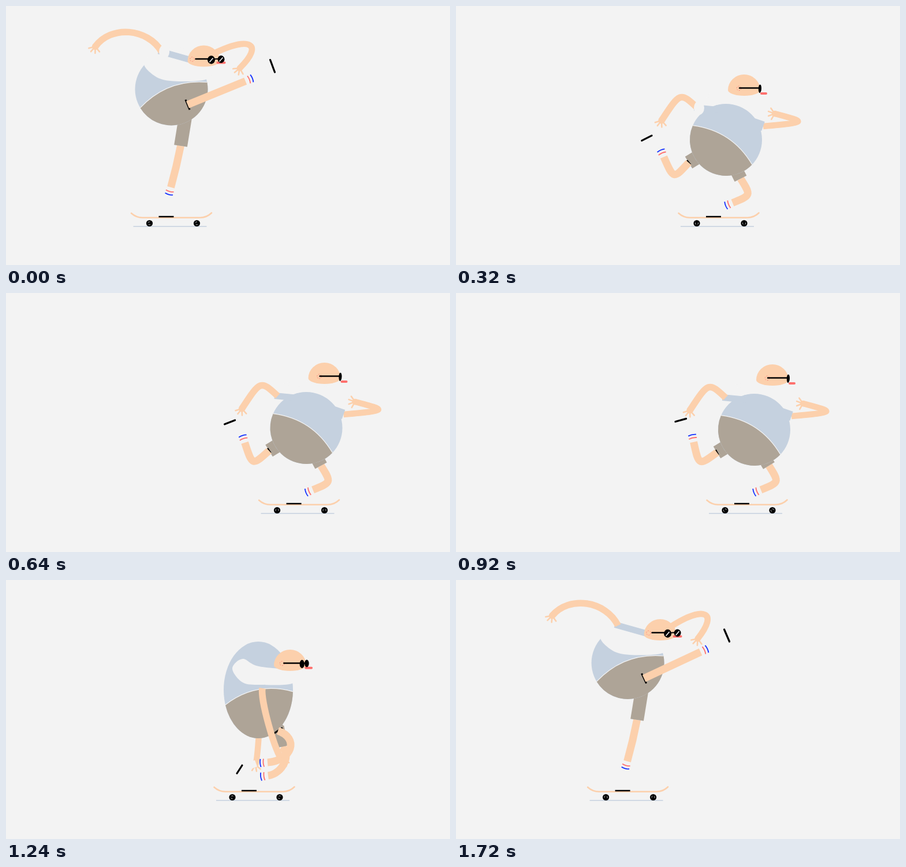
Recreate the animation shown at these times as an HTML page with a canvas. Size 769x450 px, loop 1.76 s.

```html
<!DOCTYPE html>
<html lang="en">
<head>
<meta charset="utf-8">
<title>Skater</title>
<style>
html, body { margin: 0; width: 100%; height: 100%; overflow: hidden; background: #f3f3f3; }
canvas { display: block; }
</style>
</head>
<body>
<canvas id="stage" width="769" height="450"></canvas>
<script>
const ctx = document.getElementById('stage').getContext('2d');
const LOOP = 1760, STEP = 40, RAD = Math.PI / 180;
const PAPER = '#f3f3f3', SKIN = '#fcd0ac', SHIRT = '#c5d1df', SHORTS = '#aea497',
      RED = '#ff706d', BLUE = '#1230ff', BLACK = '#000';

// Points become relative to the middle of the board. Limbs are root, joint, tip.
// belt: angle of the shorts; round: softness of the joints; turn: 0 = half view, 1 = profile.
function pose(boardX, points, scalars) {
  const out = { ...scalars };
  for (const name in points) out[name] = points[name].map((v, i) => i % 2 ? v : v - boardX);
  return out;
}

const kick = pose(297, {
  center: [297,144], hip: [324,175], neck: [326,92], head: [353,92],
  near: [280,79, 226,41, 166,62],
  far: [370,82, 430,60, 418,102],
  stand: [313,243, 305,279, 296,315],
  leg: [325,171, 374,148, 423,125],
  sole: [473,107, 464,86],
  beard: [250,96, 268,121, 300,130, 357,127, 368,105, 335,78, 292,72]
}, { radius: [63, 63], belt: [69], round: [0.55], turn: [0] });

const glide = pose(507, {
  center: [519.5,234.5], hip: [530,272], neck: [500,182], head: [551,145],
  near: [470,179, 440,161, 408,201],
  far: [584,211, 644,203, 604,189],
  stand: [545,300, 557,327, 531,342],
  leg: [455,274, 428,292, 413,260],
  sole: [396,221, 378,228],
  beard: [480,158, 490,161, 510,163, 550,163, 560,160, 540,155, 500,154]
}, { radius: [62.5, 62.5], belt: [123.5], round: [0], turn: [1] });

const crouch = pose(430, {
  center: [437,191], hip: [470,255], neck: [430,190], head: [492,145],
  near: [444,188, 455,252, 479,314],
  far: [440,200, 438,268, 432,321],
  stand: [477,290, 482,318, 454,340],
  leg: [471,262, 492,293, 453,317],
  sole: [409,322, 400,336],
  beard: [392,154, 410,178, 440,182, 495,180, 515,160, 438,150, 410,137]
}, { radius: [60, 84], belt: [82], round: [0.7], turn: [0.55] });

function mix(a, b, k) {
  const out = {};
  for (const name in a) out[name] = a[name].map((v, i) => v + (b[name][i] - v) * k);
  return out;
}

function rotate(points, [cx, cy], angle) {
  const c = Math.cos(angle), s = Math.sin(angle);
  return points.map((v, i) => i % 2
    ? cy + (points[i - 1] - cx) * s + (v - cy) * c
    : cx + (v - cx) * c - (points[i + 1] - cy) * s);
}

// Swings limbs about their roots and lowers all but the standing leg.
function adjust(base, drop, swing) {
  const out = { ...base };
  for (const name in swing) out[name] = rotate(base[name], base[name], swing[name]);
  out.sole = rotate(base.sole, base.leg, swing.leg);
  for (const name of ['center', 'hip', 'neck', 'head', 'near', 'far', 'leg', 'sole', 'beard'])
    out[name] = out[name].map((v, i) => i % 2 ? v + drop : v);
  return out;
}

const kickEnd = adjust(kick, 0.5, { leg: 0.05, near: -0.07, far: 0.12 });
const kickLow = adjust(kick, 3, { leg: 0.03 });
const push = { ...mix(kick, glide, 0.5),
  near: [-30,120, -92,98, -150,125], leg: [2,235, 17,290, -2,345], sole: [-22,381, 5,381] };
const reach = { ...mix(glide, crouch, 0.35),
  far: [72,203, 125,209, 176,225], leg: [-40,272, -80,288, -100,270], sole: [-117,238, -131,254] };

const linear = k => k, easeIn = k => k * k, easeOut = k => k * (2 - k);
const poseKeys = [
  [0, kickEnd, easeIn], [180, push, easeOut],
  [320, adjust(glide, -2, { leg: -0.1 }), linear],
  [640, glide, linear],
  [920, adjust(glide, 3, { leg: 0.1 }), easeIn],
  [1120, reach, linear], [1240, crouch, easeOut],
  [1440, kickLow, linear], [1480, kickLow, linear],
  [1720, kick, linear], [LOOP, kickEnd, linear]
];
const boardKeys = [
  [-40, 297], [0, 286.5], [150, 242], [240, 345], [320, 455], [480, 497],
  [700, 508.5], [920, 504], [1240, 430], [1760, 286.5], [1800, 275.5]
];

function poseAt(t) {
  const i = poseKeys.findIndex(key => key[0] > t) - 1;
  const [t0, from, ease] = poseKeys[i], [t1, to] = poseKeys[i + 1];
  return mix(from, to, ease((t - t0) / (t1 - t0)));
}

function boardAt(t) {
  const i = boardKeys.findIndex(key => key[0] > t) - 1;
  const slope = j => (boardKeys[j + 1][1] - boardKeys[j - 1][1]) / (boardKeys[j + 1][0] - boardKeys[j - 1][0]);
  const [t0, x0] = boardKeys[i], [t1, x1] = boardKeys[i + 1];
  const d = t1 - t0, k = (t - t0) / d, k2 = k * k, k3 = k2 * k;
  return x0 * (2 * k3 - 3 * k2 + 1) + x1 * (3 * k2 - 2 * k3) +
    d * (slope(i) * (k3 - 2 * k2 + k) + slope(i + 1) * (k3 - k2));
}

function stroke(color, width, cap = 'butt') {
  ctx.strokeStyle = color;
  ctx.lineWidth = width;
  ctx.lineCap = cap;
  ctx.stroke();
}
function fill(color) { ctx.fillStyle = color; ctx.fill(); }
function line([x1, y1], [x2, y2], color, width, cap) {
  ctx.beginPath();
  ctx.moveTo(x1, y1);
  ctx.lineTo(x2, y2);
  stroke(color, width, cap);
}
function arc(x, y, rx, ry, from = 0, to = 7) {
  ctx.beginPath();
  ctx.ellipse(x, y, rx, ry, 0, from, to);
}
function oval(x, y, rx, ry, color) { arc(x, y, rx, ry); fill(color); }

// Draws a curve through the joint; returns the tip and its direction.
function limb([ax, ay, mx, my, bx, by], round, width) {
  const control = (a, m, b, side) => (8 * m - a - b) / 6 + side * round / 2 * (a - b);
  const cx = control(ax, mx, bx, -1), cy = control(ay, my, by, -1);
  ctx.beginPath();
  ctx.moveTo(ax, ay);
  ctx.bezierCurveTo(control(ax, mx, bx, 1), control(ay, my, by, 1), cx, cy, bx, by);
  stroke(SKIN, width);
  return [bx, by, Math.atan2(by - cy, bx - cx)];
}

function arm(points, round, width) {
  const [x, y, angle] = limb(points, round, width);
  oval(x, y, width / 2, width / 2, SKIN);
  for (const spread of [40, 5, -35, -75]) {
    const a = angle + spread * RAD;
    line([x, y], [x + 11.5 * Math.cos(a), y + 11.5 * Math.sin(a)], SKIN, 2.6, 'round');
  }
}

function leg(points, round) {
  const [x, y, angle] = limb(points, round, 13);
  ctx.save();
  ctx.translate(x, y);
  ctx.rotate(angle);
  for (const [d, color] of [[6.5, RED], [12, BLUE]]) {
    ctx.beginPath();
    ctx.moveTo(d, -7);
    ctx.quadraticCurveTo(d + 2, 0, d, 7);
    stroke(color, 1.8);
  }
  ctx.restore();
  return [x + 20 * Math.cos(angle), y + 20 * Math.sin(angle)];
}

function blob(p) {
  const n = p.length, at = i => p[(i + n) % n];
  ctx.beginPath();
  ctx.moveTo(p[0], p[1]);
  for (let i = 0; i < n; i += 2) {
    const ahead = j => at(j) + (at(j + 2) - at(j - 2)) / 6;
    const behind = j => at(j) - (at(j + 2) - at(j - 2)) / 6;
    ctx.bezierCurveTo(ahead(i), ahead(i + 1), behind(i + 2), behind(i + 3), at(i + 2), at(i + 3));
  }
  fill(PAPER);
}

function shorts({ center: [x, y], radius: [rx, ry], belt: [angle] }) {
  const ends = [80, -80].map(side => {
    const a = (angle + side) * RAD;
    return [x + rx * Math.cos(a), y + ry * Math.sin(a)];
  });
  const [[lx, ly], [hx, hy]] = ends, bulge = 30 / Math.hypot(hx - lx, hy - ly);
  const belt = [(lx + hx) / 2 + (hy - ly) * bulge, (ly + hy) / 2 - (hx - lx) * bulge, hx, hy];
  arc(x, y, rx, ry, (angle - 80) * RAD, (angle + 80) * RAD);
  ctx.quadraticCurveTo(...belt);
  fill(SHORTS);
  ctx.beginPath();
  ctx.moveTo(lx, ly);
  ctx.quadraticCurveTo(...belt);
  stroke(PAPER, 1.2);
}

function head([x, y], turn) {
  const between = (a, b) => a + (b - a) * turn;
  const lenses = [[between(13, 27), 1, between(6.5, 2.2), 7.2], [between(30, 28), 0, between(6, 2), 6.5]];
  ctx.save();
  ctx.translate(x, y);
  arc(0, 3, 28, 27, Math.PI, 2 * Math.PI);
  ctx.ellipse(0, 3, 28, 10, 0, 0, Math.PI);
  fill(SKIN);
  ctx.setLineDash([2, 2]);
  arc(between(-20, -9), 0, 3.8, 3.8);
  stroke(RED, 0.8);
  ctx.setLineDash([]);
  const mouthY = between(6, 9);
  line([between(24, 30), mouthY], [between(36, 38), mouthY], RED, 4, 'round');
  line([between(-14, -8), -0.5], [lenses[0][0], -0.5], BLACK, 2.4, 'round');
  line([lenses[0][0], 0], [lenses[1][0], -1], BLACK, 2);
  for (const [lx, ly, rx, ry] of lenses) {
    oval(lx, ly, rx, ry, BLACK);
    if (rx > 5.5) line([lx - 3, ly + 4], [lx + 3, ly - 3], PAPER, 1.7);
  }
  ctx.restore();
}

function board(cx) {
  line([-66, 383], [61, 383], SHIRT, 1.3);
  ctx.beginPath();
  ctx.moveTo(-69.5, 360);
  ctx.quadraticCurveTo(-61, 367.7, -50, 367.7);
  ctx.lineTo(50, 367.7);
  ctx.quadraticCurveTo(61, 367.7, 69.5, 359.5);
  stroke(SKIN, 2.6, 'round');
  for (const x of [-38, 44]) {
    oval(x, 377.5, 5.6, 5.6, BLACK);
    for (const start of [0, 2.6]) {
      arc(x, 377.5, 2.6, 2.6, cx / 5.6 + start, cx / 5.6 + start + 1.4);
      stroke(PAPER, 0.8);
    }
  }
  line([-22, 366], [4, 366], BLACK, 2.5);
}

function skater(p, t) {
  const [round] = p.round, [nx, ny] = p.near, [kx, ky, jx, jy] = p.leg;
  arm(p.far, round, 10.5);
  line(p.neck, p.far, SHIRT, 17);
  leg(p.stand, round);
  line(p.hip, p.stand, SHORTS, 23);
  line(p.center, p.leg, SHORTS, 24);
  oval(...p.center, ...p.radius, SHIRT);
  blob(p.beard);
  line(p.neck, p.near, SHIRT, 11, 'square');
  shorts(p);

  // Hem crease across the top of the free leg
  const crease = (5 + 9 * Math.min(round, 0.5)) / Math.hypot(jx - kx, jy - ky);
  const ox = (jy - ky) * crease, oy = (jx - kx) * crease;
  line([kx + ox, ky - oy], [kx - ox, ky + oy], BLACK, 3);
  const ankle = leg(p.leg, round), [hx, hy, tx, ty] = p.sole;
  line(ankle, [(hx + tx) / 2, (hy + ty) / 2], PAPER, 12);
  line([hx, hy], [tx, ty], BLACK, 3.2, 'round');

  head(p.head, p.turn[0]);
  arm(p.near, round, 11.5);
  // The beard blows over the shoulder during the push
  if (t < 400) oval(nx + (p.neck[0] - nx) * 0.1, ny, 9, 12, PAPER);
}

function draw() {
  const t = Math.floor(performance.now() % LOOP / STEP) * STEP;
  const cx = boardAt(t);
  ctx.fillStyle = PAPER;
  ctx.fillRect(0, 0, 769, 450);
  ctx.save();
  ctx.translate(cx, 0);
  board(cx);
  skater(poseAt(t), t);
  ctx.restore();
  requestAnimationFrame(draw);
}
draw();
</script>
</body>
</html>
```
